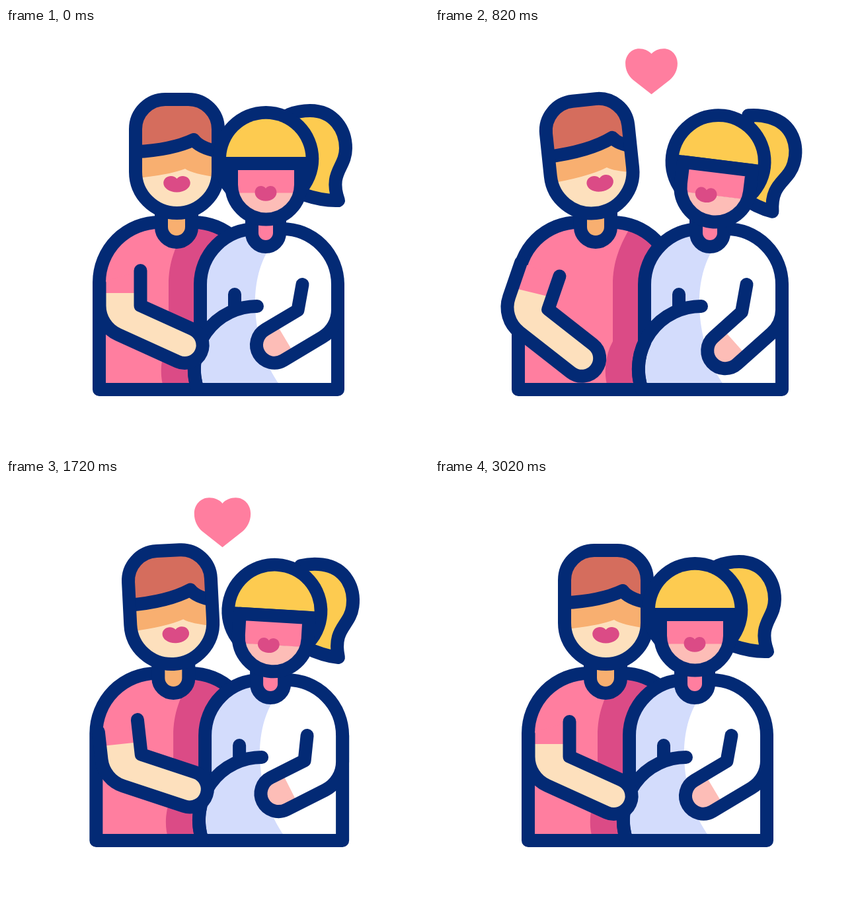
Animation of 640 by 640 pixels, one loop 3.1 s. Source, as an HTML page with a canvas:

```html
<!DOCTYPE html>
<html lang="en">
<head>
<meta charset="utf-8">
<title>Expecting couple</title>
<style>
html, body { margin: 0; width: 100%; height: 100%; overflow: hidden; background: #fff; }
canvas { display: block; width: 100vmin; height: 100vmin; }
</style>
</head>
<body>
<canvas id="stage" width="640" height="640"></canvas>
<script>
const ctx = document.getElementById('stage').getContext('2d');
const LOOP = 3100, DEG = Math.PI / 180, HAND = 27;
const NAVY = '#032a75', PINK = '#ff7e9f', ROSE = '#db4b86', SKIN = '#fde0bd', TAN = '#f8af70',
  BROWN = '#d56d5d', GOLD = '#fdcb50', LILAC = '#d3dcfc', BLUSH = '#fdbdb7', WHITE = '#fff';

// Smooth track through [time, value] keys, without overshoot.
function track(keys) {
  const last = keys.length - 1;
  const rise = keys.slice(1).map((k, i) => (k[1] - keys[i][1]) / (k[0] - keys[i][0]));
  const slope = keys.map((k, i) => {
    if (i === 0 || i === last) return 0;
    const a = rise[i - 1], b = rise[i];
    return a * b > 0 ? 2 * a * b / (a + b) : 0;
  });
  return t => {
    if (t <= keys[0][0]) return keys[0][1];
    if (t >= keys[last][0]) return keys[last][1];
    let i = 0;
    while (t > keys[i + 1][0]) i++;
    const h = keys[i + 1][0] - keys[i][0], u = (t - keys[i][0]) / h, v = 1 - u;
    return v * v * (1 + 2 * u) * keys[i][1] + u * u * (3 - 2 * u) * keys[i + 1][1] +
      h * u * v * (v * slope[i] - u * slope[i + 1]);
  };
}

const sway = track([[0, 0], [100, 0], [340, .21], [540, .55], [820, 1], [860, 1.02], [1140, .64],
  [1630, .36], [1720, .31], [2200, .16], [2700, .04], [3020, 0]]);
const headTilt = track([[0, 0], [100, 0], [340, .21], [540, .55], [820, 1], [880, 1.02], [1140, .87],
  [1720, .48], [2200, .22], [3020, 0]]);
const manSwing = track([[0, 0], [100, 0], [340, 3.4], [540, 11], [820, 19], [860, 20],
  [1140, -6.2], [1720, -6.4], [2200, -12.4], [3020, 0]]);
const womanBend = track([[0, 56], [100, 56], [340, 59], [820, 67], [1140, 62], [1720, 52],
  [2200, 41], [3020, 56]]);
const womanElbow = track([[0, 441.5], [820, 441], [1140, 442], [1720, 444.5], [2200, 447],
  [3020, 441.5]]);

const smooth = (a, b, t) => {
  const u = Math.min(1, Math.max(0, (t - a) / (b - a)));
  return u * u * (3 - 2 * u);
};

const shapes = {
  manBody: new Path2D('M141 547V385A91 91 0 0 1 232 294H284A91 91 0 0 1 375 385V547Z'),
  manShade: new Path2D('M276 296C256 328 246 355 246 388V474A95 95 0 0 0 239 547H420V296Z'),
  manNeck: new Path2D('M235 280V301A23 23 0 0 0 281 301V280'),
  manHead: new Path2D('M196 153A45 45 0 0 1 241 108H276A45 45 0 0 1 321 153V217.5A62.5 62.5 0 0 1 196 217.5Z'),
  fringe: new Path2D('M170 188Q244 188 284 169Q296 186 345 190'),
  manHair: new Path2D('M170 188Q244 188 284 169Q296 186 345 190V80H170Z'),
  brow: new Path2D('M170 229Q240 225 271 213Q286 223 345 229V150H170Z'),
  lips: new Path2D('M0 -7C5.5 -14 19.5 -12 20.3 -1C20.5 7 11.5 13.5 0 13.5C-11.5 13.5 -20.5 7 -20.3 -1C-19.5 -12 -5.5 -14 0 -7Z'),
  womanBody: new Path2D('M290 547A95 95 0 0 1 294 476V388A84 84 0 0 1 378 304H418A84 84 0 0 1 502 388V547Z'),
  belly: new Path2D('M290 547A95 95 0 0 1 380 421M346 403V427'),
  womanShade: new Path2D('M399 333C383 356 376 390 377 420C378 465 392 510 414 540V560H250V280H399Z'),
  womanNeck: new Path2D('M372 290V310A21 21 0 0 0 414 310V290'),
  tail: new Path2D('M428 131Q444 125 460 125C497 125 514 155 514 182C514 212 488 218 503 261Q480 262 450 252Z'),
  face: new Path2D('M341 205H446V237A52.5 52.5 0 0 1 341 237Z'),
  heart: new Path2D('M0 -28.5C-5 -34 -12 -37 -20 -37C-33 -37 -42.5 -26 -42.5 -13C-42.5 -1 -37 8 -30 14L0 37.5L30 14C37 8 42.5 -1 42.5 -13C42.5 -26 33 -37 20 -37C12 -37 5 -34 0 -28.5Z')
};

function fill(shape, color) {
  ctx.fillStyle = color;
  ctx.fill(shape);
}

function rect(color, x, y, w, h) {
  ctx.fillStyle = color;
  ctx.fillRect(x, y, w, h);
}

function disc(color, x, y, r) {
  ctx.fillStyle = color;
  ctx.beginPath();
  ctx.arc(x, y, r, 0, 2 * Math.PI);
  ctx.fill();
}

function group(draw) {
  ctx.save();
  draw();
  ctx.restore();
}

function outlined(shape, color) {
  fill(shape, color);
  ctx.stroke(shape);
}

function spin(x, y, deg) {
  ctx.translate(x, y);
  ctx.rotate(deg * DEG);
  ctx.translate(-x, -y);
}

function lips(x, y, sx, sy) {
  group(() => {
    ctx.translate(x, y);
    ctx.scale(sx, sy);
    fill(shapes.lips, ROSE);
  });
}

// top, elbow: inner arm line; outer, dir: outer upper-arm line; side: 1 reaches right, -1 left.
function arm(top, elbow, hand, outer, dir, side, color, paint) {
  const dx = hand.x - elbow.x, dy = hand.y - elbow.y;
  const ang = Math.atan2(dy, dx) - side * Math.asin(HAND / Math.hypot(dx, dy));
  const fx = Math.cos(ang), fy = Math.sin(ang);
  const nx = side * HAND * fy, ny = -side * HAND * fx;
  const low = { x: hand.x - nx, y: hand.y - ny };
  const s = ((low.x - outer.x) * fy - (low.y - outer.y) * fx) / (dir.x * fy - dir.y * fx);
  const p = new Path2D();
  p.moveTo(top.x, top.y);
  p.lineTo(elbow.x, elbow.y);
  p.lineTo(hand.x + nx, hand.y + ny);
  p.arc(hand.x, hand.y, HAND, ang - side * Math.PI / 2, ang + side * Math.PI / 2, side < 0);
  p.arcTo(outer.x + dir.x * s, outer.y + dir.y * s, outer.x, outer.y, 48);
  p.lineTo(outer.x, outer.y);
  fill(p, color);
  group(() => {
    ctx.clip(p);
    paint(ang);
  });
  ctx.stroke(p);
}

function drawMan(p, tilt) {
  group(() => {
    ctx.translate(-15 * p, 0);
    fill(shapes.manBody, PINK);
    group(() => {
      ctx.clip(shapes.manBody);
      ctx.translate(38 * p, 0);
      fill(shapes.manShade, ROSE);
    });
    ctx.stroke(shapes.manBody);
    outlined(shapes.manNeck, TAN);

    spin(258.5, 280, -6 * tilt);
    fill(shapes.manHead, SKIN);
    group(() => {
      ctx.clip(shapes.manHead);
      ctx.translate(11 * tilt, 0);
      fill(shapes.brow, TAN);
      fill(shapes.manHair, BROWN);
      ctx.stroke(shapes.fringe);
      lips(258.5, 235, 1, 1);
    });
    ctx.stroke(shapes.manHead);
  });
}

function drawManArm(p, swing) {
  const a = swing * DEG, c = Math.cos(a), s = Math.sin(a);
  const reach = (41.8 + swing * (swing > 0 ? .72 : .95)) * DEG;
  const width = 62 + .2 * Math.min(0, swing);
  const drop = Math.max(0, 18 - Math.abs(swing));
  const top = { x: 203.5, y: 367 + .45 * swing };
  const elbow = { x: top.x - 53 * s, y: top.y + 53 * c };
  const hand = { x: elbow.x + 90 * Math.cos(reach), y: elbow.y + 90 * Math.sin(reach) };
  const outer = { x: top.x - width * c - drop * s, y: top.y - width * s + drop * c };
  group(() => {
    ctx.translate(-15 * p, 0);
    arm(top, elbow, hand, outer, { x: -s, y: c }, 1, PINK, ang => {
      ctx.translate(top.x - 34 * s, top.y + 34 * c);
      ctx.rotate(ang - 24.4 * DEG);
      rect(SKIN, -300, 0, 600, 300);
    });
  });
}

function drawWomanHead(tilt) {
  spin(365, 300, 7 * tilt);
  group(() => {
    spin(480, 140, 9 * tilt);
    outlined(shapes.tail, GOLD);
  });
  disc(NAVY, 393.3, 198, 80);
  group(() => {
    ctx.beginPath();
    ctx.rect(320, 120, 150, 75);
    ctx.clip();
    disc(GOLD, 393.3, 198, 60.3);
  });
  group(() => {
    ctx.clip(shapes.face);
    rect(PINK, 330, 200, 130, 50);
    rect(BLUSH, 330, 249.5, 130, 60);
    lips(393 - 12 * tilt, 249.3, .81, .92);
  });
  ctx.stroke(shapes.face);
}

function drawWoman(p, tilt, bend, elbowX) {
  const w = bend * DEG;
  const elbow = { x: elbowX, y: 427 + .25 * (bend - 56) };
  const hand = { x: elbow.x - 63.5 * Math.cos(w), y: elbow.y + 63.5 * Math.sin(w) };
  group(() => {
    ctx.translate(23 * p, 0);
    fill(shapes.womanBody, WHITE);
    group(() => {
      ctx.clip(shapes.womanBody);
      fill(shapes.womanShade, LILAC);
    });
    ctx.stroke(shapes.womanBody);
    ctx.stroke(shapes.belly);
    arm({ x: 448.5, y: 388 }, elbow, hand, { x: 502, y: 388 }, { x: 0, y: 1 }, -1, WHITE, ang => {
      ctx.translate(hand.x, hand.y);
      ctx.rotate(ang);
      rect(BLUSH, -19, -60, 120, 120);
    });
    outlined(shapes.womanNeck, PINK);
    drawWomanHead(tilt);
  });
}

function drawHeart(t) {
  const beat = 83 + 8 * Math.cos((t - 470) / 1040 * 2 * Math.PI);
  const size = beat * smooth(0, 460, t) * (1 - smooth(2620, 3010, t)) / 85;
  if (size < .01) return;
  group(() => {
    ctx.translate(327.5, 65.5);
    ctx.scale(size, size);
    fill(shapes.heart, PINK);
  });
}

const start = performance.now();

function frame(now) {
  const t = Math.max(0, now - start) % LOOP, p = sway(t), tilt = headTilt(t);
  rect(WHITE, 0, 0, 640, 640);
  ctx.strokeStyle = NAVY;
  ctx.lineWidth = 20;
  ctx.lineCap = ctx.lineJoin = 'round';
  drawHeart(t);
  drawMan(p, tilt);
  drawWoman(p, tilt, womanBend(t), womanElbow(t));
  drawManArm(p, manSwing(t));
  requestAnimationFrame(frame);
}

requestAnimationFrame(frame);
</script>
</body>
</html>
```
